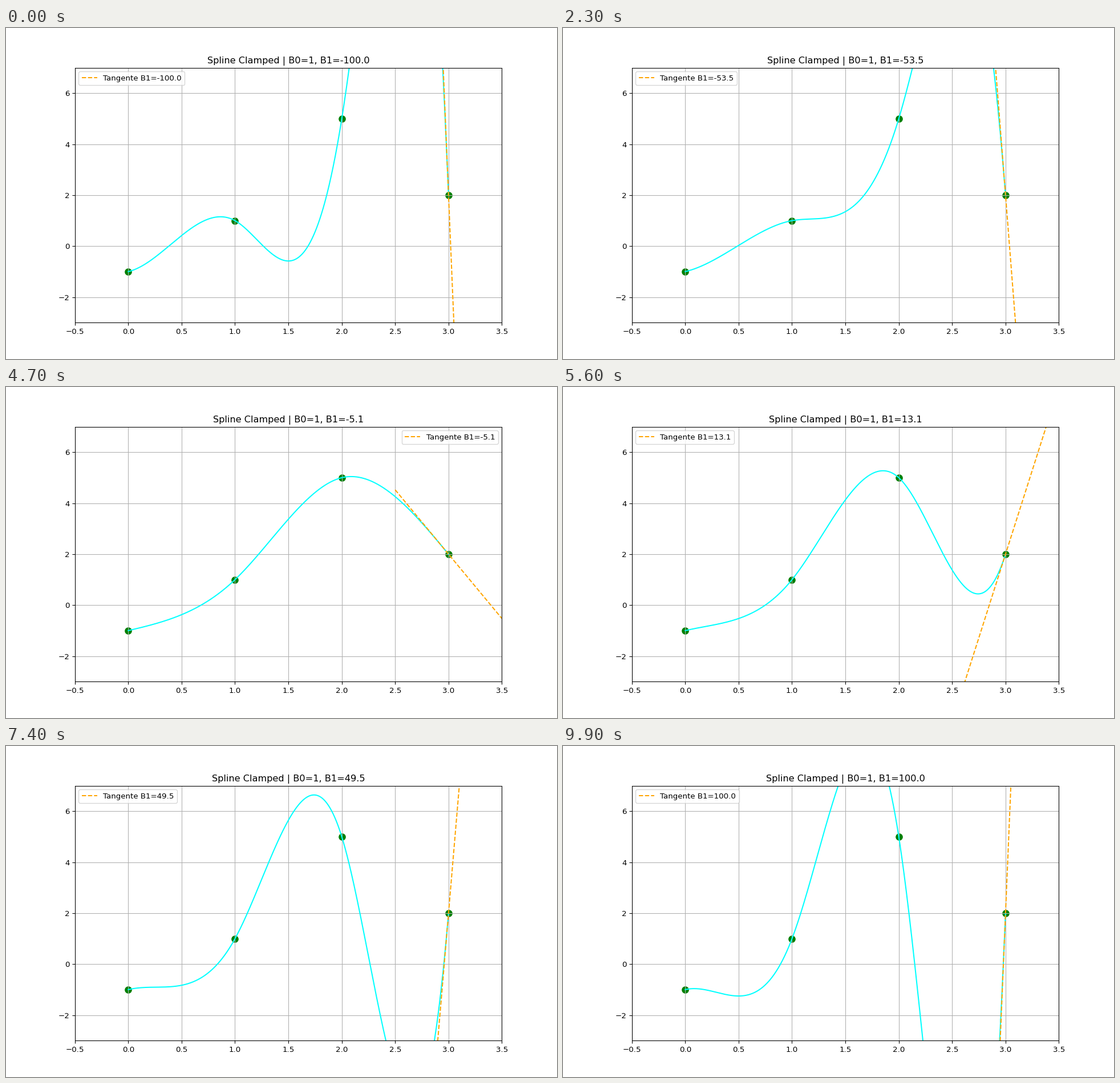
A matplotlib script that plays this animation: 966x580 px, repeating every 10000 ms.

```python
import numpy as np
import matplotlib.pyplot as plt
from matplotlib.animation import FuncAnimation

FRAMES = 100
DPI = 96.6
# A hair over whole pixels, as the canvas size is rounded down.
WIDTH, HEIGHT = 966.01, 580.01
B0 = 1
XS = np.array([0.0, 1.0, 2.0, 3.0])
YS = np.array([-1.0, 1.0, 5.0, 2.0])
END_SLOPES = np.linspace(-100, 100, FRAMES)

x = np.linspace(0, 3, 601)
x_tan = np.array([2.5, 3.5])


def knot_slopes(b1):
    """Slopes at the unit-spaced knots of the clamped cubic spline."""
    system = np.array([[4.0, 1.0], [1.0, 4.0]])
    rhs = 3 * (YS[2:] - YS[:-2]) - np.array([B0, b1])
    return np.concatenate([[B0], np.linalg.solve(system, rhs), [b1]])


def spline(x, b1):
    m = knot_slopes(b1)
    i = np.minimum(x.astype(int), len(XS) - 2)
    t = x - XS[i]
    rise = YS[i + 1] - YS[i]
    c2 = 3 * rise - 2 * m[i] - m[i + 1]
    c3 = m[i] + m[i + 1] - 2 * rise
    return YS[i] + t * (m[i] + t * (c2 + t * c3))


fig, ax = plt.subplots(figsize=(WIDTH / DPI, HEIGHT / DPI), dpi=DPI)
ax.set_xlim(-0.5, 3.5)
ax.set_ylim(-3, 7)
ax.grid(True)
ax.scatter(XS, YS, s=70, color="green")
curve, = ax.plot([], [], color="cyan")
tangent, = ax.plot([], [], "--", color="orange")


def update(frame):
    b1 = END_SLOPES[frame]
    curve.set_data(x, spline(x, b1))
    tangent.set_data(x_tan, YS[-1] + b1 * (x_tan - XS[-1]))
    tangent.set_label(f"Tangente B1={b1:.1f}")
    ax.set_title(f"Spline Clamped | B0={B0}, B1={b1:.1f}")
    # A steep tangent runs through the upper right corner.
    ax.legend(loc="upper right" if abs(b1) < 10 else "upper left")
    return curve, tangent


anim = FuncAnimation(fig, update, frames=FRAMES, interval=100, repeat=True)
plt.show()
```
